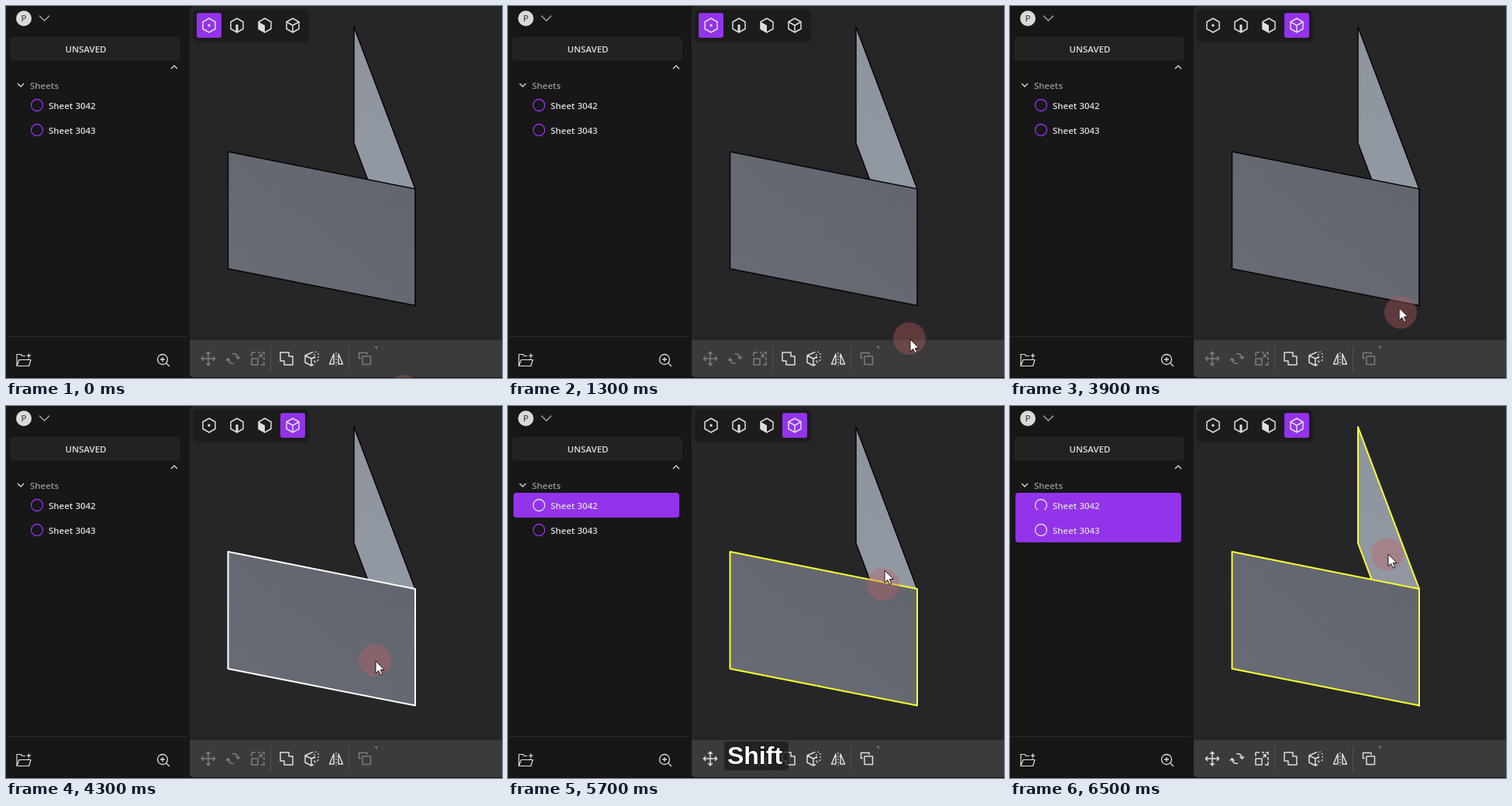
An HTML page that plays this animation: 640 px wide and 480 px high, repeating every 8 s.

```html
<!DOCTYPE html>
<html lang="en">
<head>
<meta charset="utf-8">
<title>Sheet selection</title>
<style>
html, body { margin: 0; width: 100%; height: 100%; overflow: hidden; background: #171717; }
svg { display: block; width: 640px; height: 480px; }
text { font: 600 11.5px "Open Sans", "Noto Sans", sans-serif; fill: #dcdcdc; }
.icon { fill: none; stroke: #dedede; stroke-width: 1.5; stroke-linejoin: round; }
.solid { fill: #dedede; stroke: none; }
.accent { fill: #9333ea; }
.key { visibility: hidden; }
.key rect { fill: #1d1d1d; fill-opacity: .78; }
.key text {
  font: bold 32px "Liberation Sans", Arial, sans-serif;
  fill: #fff; stroke: #111; stroke-width: 2.5; paint-order: stroke; text-anchor: middle;
}
.plate { stroke: #050506; stroke-width: 1.5; stroke-linejoin: round; }

/* The whole scene shares one 8 s clock; 100 ms is 1.25 %. */
#halo, #pointer, .fade, .tool { animation: 8s infinite; }
.plate, .key { animation: 8s step-end infinite; }
#halo { animation-name: halo; }
#pointer { animation-name: pointer; }
#mode-off { animation-name: mode-off; }
#mode-on { animation-name: mode-on; }
#front { animation-name: front; }
#back { animation-name: back; }
#four { animation-name: four; }
#shift { animation-name: shift; }
.first { animation-name: first; }
.second { animation-name: second; }
.tool { animation-name: tool; }

@keyframes halo {
  0%, 8.75% { transform: translate(513px, 497px); animation-timing-function: steps(7, start); }
  17.5%, 47.5% { transform: translate(518px, 429px); animation-timing-function: steps(6, start); }
  55%, 66.25% { transform: translate(476px, 328px); animation-timing-function: steps(7, start); }
  75%, 100% { transform: translate(487px, 191px); }
}
/* The pointer runs one step ahead of its halo. */
@keyframes pointer {
  0%, 8.75% { transform: translate(514px, 498px); animation-timing-function: steps(6, start); }
  16.25%, 47.5% { transform: translate(519px, 430px); animation-timing-function: steps(5, start); }
  53.75%, 66.25% { transform: translate(477px, 329px); animation-timing-function: steps(5, start); }
  72.5% { transform: translate(486px, 212px); animation-timing-function: steps(1, start); }
  73.75%, 100% { transform: translate(488px, 191px); }
}
@keyframes mode-off {
  0%, 31.25% { opacity: 1; animation-timing-function: steps(4, start); }
  36.25%, 100% { opacity: 0; }
}
@keyframes mode-on {
  0%, 31.25% { opacity: 0; animation-timing-function: steps(4, start); }
  36.25%, 100% { opacity: 1; }
}
@keyframes front {
  0% { stroke: #050506; stroke-width: 1.5; }
  51.25% { stroke: #fff; stroke-width: 2; }
  58.75%, 100% { stroke: #ffff30; stroke-width: 2; }
}
@keyframes back {
  0% { stroke: #050506; stroke-width: 1.5; }
  72.5% { stroke: #fff; stroke-width: 2; }
  78.75%, 100% { stroke: #ffff30; stroke-width: 2; }
}
@keyframes four {
  0%, 43.75%, 100% { visibility: hidden; }
  31.25% { visibility: visible; }
}
@keyframes shift {
  0%, 80%, 100% { visibility: hidden; }
  68.75% { visibility: visible; }
}
@keyframes first {
  0%, 58.75% { opacity: 0; animation-timing-function: steps(3, start); }
  62.5%, 100% { opacity: 1; }
}
@keyframes second {
  0%, 78.75% { opacity: 0; animation-timing-function: steps(3, start); }
  82.5%, 100% { opacity: 1; }
}
@keyframes tool {
  0%, 58.75% { opacity: .4; animation-timing-function: steps(3, start); }
  62.5%, 100% { opacity: 1; }
}
</style>
</head>
<body>
<svg viewBox="0 0 640 480">
  <defs>
    <linearGradient id="frontFill" x1="0" y1="1" x2="1" y2="0">
      <stop offset="0" stop-color="#686c75"/><stop offset="1" stop-color="#61656e"/>
    </linearGradient>
    <linearGradient id="backFill" x1="0" y1="0" x2="0" y2="1">
      <stop offset="0" stop-color="#8d949e"/><stop offset="1" stop-color="#959ca4"/>
    </linearGradient>
    <filter id="soft" x="-10%" y="-30%" width="120%" height="160%">
      <feDropShadow dx="0" dy="1" stdDeviation="2" flood-opacity=".4"/>
    </filter>
    <path id="hex" d="M0-9 8-4.5V4.5L0 9-8 4.5V-4.5Z"/>
    <path id="arrow" d="M0 0V16L3.7 12.5 6.3 18 8.8 17 6.3 11.5H11.2Z"/>
  </defs>

  <rect width="640" height="480" fill="#171717"/>
  <rect y="479" width="640" height="1" fill="#150b0e"/>

  <!-- Sidebar -->
  <circle cx="23" cy="16" r="10" fill="#dadada"/>
  <text x="23" y="20" text-anchor="middle" style="font-weight:400;fill:#222">P</text>
  <path class="icon" d="M43 12.5 49.5 19 56 12.5" style="stroke:#aaa;stroke-width:1.3"/>
  <rect x="5" y="40" width="220" height="31" rx="5" fill="#222"/>
  <text x="103" y="60" text-anchor="middle">UNSAVED</text>
  <path class="icon" d="M213 81 217 77 221 81" style="stroke-width:1.3"/>
  <path class="icon" d="M15 100 19 104 23 100" style="stroke-width:1.3"/>
  <text x="31" y="107" style="fill:#969696">Sheets</text>

  <g fill="none" stroke="#9333ea" stroke-width="1.3">
    <circle cx="40" cy="128" r="7.5"/>
    <circle cx="40" cy="160" r="7.5"/>
  </g>
  <g class="fade second">
    <rect class="accent" x="7" y="134" width="214" height="42" rx="4"/>
    <circle class="icon" cx="40" cy="160" r="7.5" style="stroke-width:1.3"/>
  </g>
  <g class="fade first">
    <rect class="accent" x="7" y="112" width="214" height="32" rx="4"/>
    <circle class="icon" cx="40" cy="128" r="7.5" style="stroke-width:1.3"/>
  </g>
  <rect class="accent fade second" x="7" y="134" width="214" height="14"/>
  <text x="55" y="133">Sheet 3042</text>
  <text x="55" y="165">Sheet 3043</text>

  <path d="M0 426.5H233" stroke="#2b2b2b"/>
  <path class="icon" d="M25 451.5H21L19 449.5H14V464.5H29.5L32 456.5H17L14 464.5M29 456V455M29.5 448.5V454M26.8 451.2H32.2" style="stroke-width:1.2"/>
  <g class="icon" style="stroke-width:1.3">
    <circle cx="202" cy="456" r="6.5"/>
    <path d="M206.8 460.8 211 465M199 456H205M202 453V459"/>
  </g>

  <!-- Viewport -->
  <path d="M640 0H243Q237 0 237 6V473Q237 479 243 479H640Z" fill="#262628"/>
  <path d="M237 431H640V479H243Q237 479 237 473Z" fill="#3b3b3b"/>
  <path id="back" class="plate" d="M449 27 528 236V387L449 177Z" fill="url(#backFill)"/>
  <path id="front" class="plate" d="M286.5 188 528 236V386.5L286.5 339Z" fill="url(#frontFill)"/>

  <!-- Selection modes -->
  <rect x="242" y="5" width="148" height="40" rx="5" fill="#1b1b1c" filter="url(#soft)"/>
  <rect id="mode-off" class="accent fade" x="246" y="9" width="32" height="32" rx="3"/>
  <rect id="mode-on" class="accent fade" x="354" y="9" width="32" height="32" rx="3"/>
  <g class="icon">
    <g transform="translate(262 25)"><use href="#hex"/><circle class="solid" r="1.7"/></g>
    <g transform="translate(298 25)"><use href="#hex"/><path d="M0-1V9" stroke-width="3"/></g>
    <g transform="translate(334 25)"><use href="#hex"/><path class="solid" d="M-8-4.5 0 0V9L-8 4.5Z"/></g>
    <g transform="translate(370 25)"><use href="#hex"/><path d="M-8-4.5 0 0 8-4.5M0 0V9"/></g>
  </g>

  <!-- Tools -->
  <path d="M341.5 439V471M442.5 439V471" stroke="#525252"/>
  <g class="icon">
    <g class="tool" transform="translate(261 455)">
      <path d="M-8.5 0H8.5M0-8.5V8.5M-6-2.7-8.7 0-6 2.7M6-2.7 8.7 0 6 2.7M-2.7-6 0-8.7 2.7-6M-2.7 6 0 8.7 2.7 6"/>
    </g>
    <g class="tool" transform="translate(293 455)">
      <path d="M-1-6.3Q6-7 6.5-.5M3.5-2.8 6.5.3 9-2.8M1 6.3Q-6 7-6.5.5M-9 2.8-6.5-.3-3.5 2.8"/>
    </g>
    <g class="tool" transform="translate(325 455)">
      <path d="M-8-3V-8H-3M0-8H3M5-8H8V-5M8-2V2M8 4V8H4"/>
      <path d="M-8 0H0V8H-8ZM1.5-1.5 5-5M1.5-5H5V-1.5"/>
    </g>
    <path transform="translate(362 455)" d="M-8-8H3V-3H8V8H-3V3H-8Z"/>
    <g transform="translate(394 455)">
      <path d="M1-8 -8-4V5L0 9V0L-8-4M0 0 5-2.5M0 9 3 7.5"/>
      <path d="M1-8 9-9M4-6V5M9-7V2M4 5 9 2" stroke-width="1.2" stroke-dasharray="2 2"/>
    </g>
    <g transform="translate(426 455)">
      <path d="M-3-6V7H-8.5ZM3-6V7H8.5Z"/>
      <path d="M0-8V9" stroke-width="1.2" stroke-dasharray="2 2"/>
    </g>
    <g class="tool" transform="translate(463 455)">
      <path d="M-3-3H7.5V7.5H-3ZM-5-.5H-7.5V-7.5H3V-5"/>
    </g>
  </g>
  <path d="M475 439H479V443Z" fill="#777"/>

  <!-- Pressed keys -->
  <g id="four" class="key">
    <rect x="304" y="433" width="31" height="37" rx="4"/>
    <text x="318.5" y="462">4</text>
  </g>
  <g id="shift" class="key">
    <rect x="279" y="433" width="83" height="37" rx="4"/>
    <text x="318.5" y="462">Shift</text>
  </g>

  <circle id="halo" r="21" fill="#c46062" fill-opacity=".36"/>
  <use id="pointer" href="#arrow" fill="#fff" stroke="#111"/>
</svg>
</body>
</html>
```
